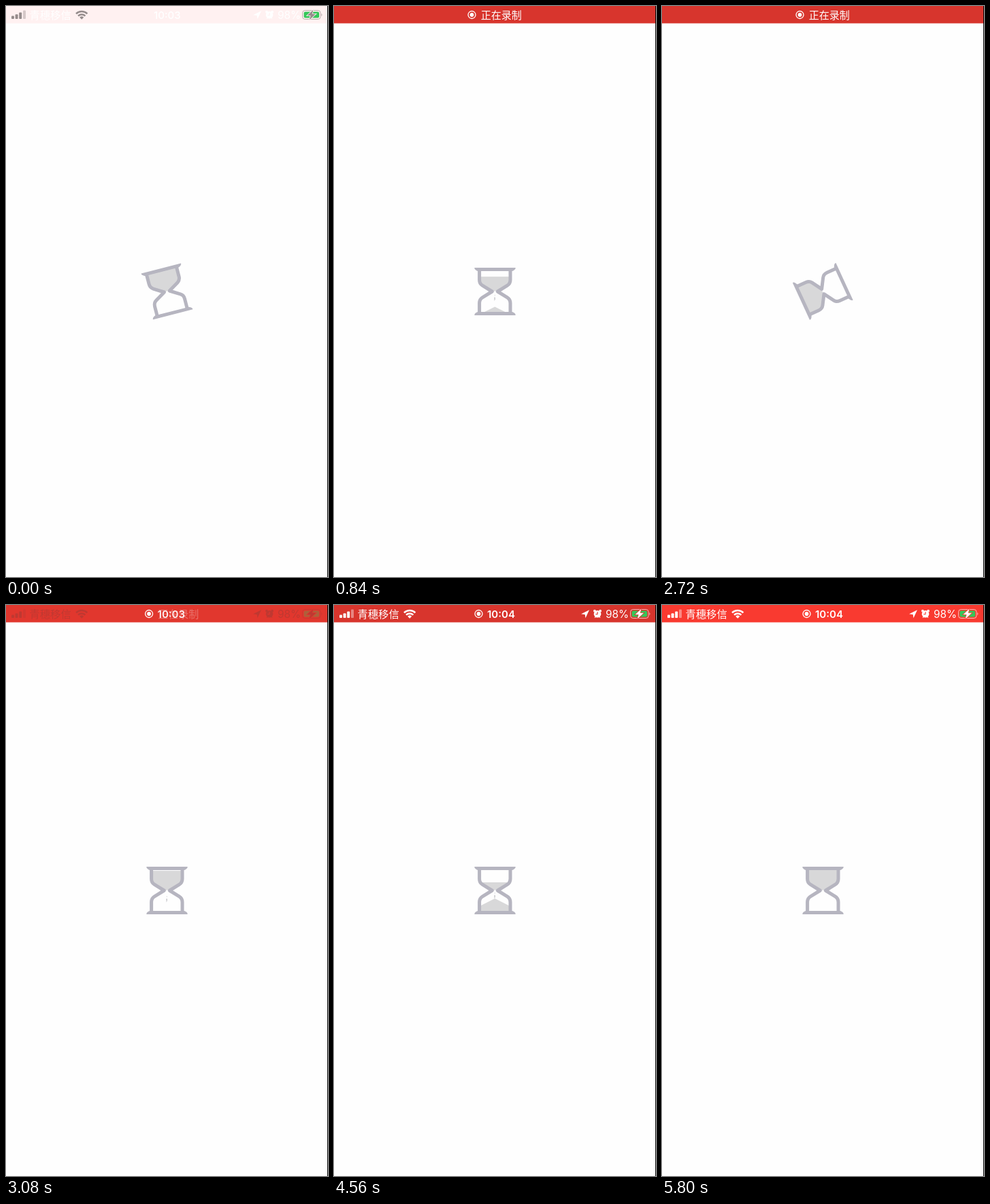
An HTML page that plays this animation: 473x840 px, repeating every 5.84 s.

```html
<!DOCTYPE html>
<html lang="zh">
<head>
<meta charset="utf-8">
<title>Hourglass loader</title>
<style>
  html, body { margin: 0; width: 100%; height: 100%; overflow: hidden; background: #fefefe; }
  svg { display: block; width: 100%; height: 100%; }
  .zh { font: 400 15px "Noto Sans CJK SC", "Noto Sans CJK", sans-serif; fill: #fff; }
  .num { font-family: Inter, "Liberation Sans", sans-serif; fill: #fff; }
  .line { fill: none; stroke: currentColor; }
  .ink { fill: currentColor; }
</style>
</head>
<body>
<svg viewBox="0 0 473 840">
  <defs>
    <clipPath id="upper"><path d="M215 389H258V406L253 411L237 419.5H235L220 411L215 406Z"/></clipPath>
    <clipPath id="lower"><path d="M215 451.5H258V434L253 429L237 420.5H235L220 429L215 434Z"/></clipPath>
    <path id="wall" d="M213.6 389V403Q213.6 408.500 218 411.200L232.300 420L218 428.800Q213.600 431.500 213.600 437V452"/>
    <path id="cap" d="M206.500 385H266.500Q267.500 387.500 262 390H211Q205.500 387.500 206.500 385Z"/>
  </defs>

  <rect width="473" height="840" fill="#fefefe"/>
  <rect id="bar" width="473" height="25.500"/>

  <g id="icons">
    <g class="ink">
      <rect x="8" y="14.500" width="4" height="4.500" rx="1"/>
      <rect x="13.600" y="12.300" width="4" height="6.700" rx="1"/>
      <rect x="19.200" y="9.600" width="4" height="9.400" rx="1"/>
      <rect x="25" y="6.500" width="4" height="12.500" rx="1" opacity=".4"/>
      <path d="M111.200 19.800L108.200 16.700A4.300 4.300 0 0 1 114.200 16.700Z"/>
    </g>
    <g class="line" stroke-width="2.500">
      <path d="M103 11.400A11.600 11.600 0 0 1 119.400 11.400"/>
      <path d="M106 14.700A7.400 7.400 0 0 1 116.400 14.700"/>
    </g>
    <g id="labels">
      <text class="zh" x="34.500" y="18.500" style="font-size:15.300px">青穗移信</text>
      <text class="num" x="399" y="18.500" font-size="15.300">98%</text>
      <path d="M363 13.200L375 7.200L369.400 19.300L368.700 13.900Z" fill="currentColor"/>
      <g fill="currentColor">
        <circle cx="387" cy="13.200" r="5.300"/>
        <circle cx="382.900" cy="8.700" r="1.900"/>
        <circle cx="391.100" cy="8.700" r="1.900"/>
        <path d="M382.500 19L384 16H390L391.500 19L389 18H385Z"/>
      </g>
      <path id="hands" d="M387 10V13.500H384.300" fill="none" stroke-width="1.100"/>
    </g>
    <rect class="line" x="435.500" y="6.500" width="26.500" height="13" rx="3.800" opacity=".65"/>
    <path class="ink" d="M463.300 11Q465.600 13 463.300 15Z" opacity=".65"/>
    <rect x="437.500" y="8.500" width="22.500" height="9" rx="2" fill="#34c759"/>
    <path id="bolt" d="M451.500 5.500L442.500 14H447.500L445.500 20.500L455 11.700H449.700Z"
          fill="currentColor" stroke-width="1.600" paint-order="stroke"/>
  </g>

  <text id="label" class="zh" x="215.800" y="18.500">正在录制</text>
  <g id="record">
    <circle cx="202.500" cy="13" r="5.500" fill="none" stroke="#fff" stroke-width="1.300"/>
    <circle cx="202.500" cy="13" r="2.900" fill="#fff"/>
  </g>
  <text id="clock" class="num" x="225" y="18.500" font-size="15" font-weight="600"></text>

  <g id="glass">
    <g fill="#d8d8d9">
      <rect id="top" x="210" width="53" clip-path="url(#upper)"/>
      <path id="pile" clip-path="url(#lower)"/>
      <path id="drop" d="M235.200 -2H237V1L235.500 3.500Z" fill="#cfcfd2"/>
      <rect id="trail" x="235.800" width="1" height="2" fill="#dfdfe2"/>
    </g>
    <g fill="none" stroke="#b6b5c0" stroke-width="5" stroke-linejoin="round">
      <use href="#wall"/>
      <use href="#wall" transform="matrix(-1 0 0 1 472.600 0)"/>
    </g>
    <g fill="#b6b5c0">
      <use href="#cap"/>
      <use href="#cap" transform="matrix(1 0 0 -1 0 840)"/>
    </g>
  </g>
  <rect x="472" width="1" height="840" fill="#080808"/>
</svg>

<script>
const LOOP = 5840, CYCLE = 2862, FIRST = 65;
const POUR_END = 2473, TURN = 2512;
const RED = [255, 59, 49], DIM = [215, 53, 45], PINK = [255, 241, 241];
const GREY = [149, 140, 140], DARK = [80, 25, 20], WHITE = [255, 255, 255];

const el = {};
document.querySelectorAll('[id]').forEach(n => el[n.id] = n);

const ramp = (t, a, b) => Math.min(1, Math.max(0, (t - a) / (b - a)));
const ease = x => (1 - Math.cos(Math.PI * x)) / 2;
const mix = (a, b, k) => a.map((v, i) => v + (b[i] - v) * k);
const rgb = c => `rgb(${c.map(Math.round)})`;
const set = (node, attrs) => {
  for (const k in attrs) node.setAttribute(k, attrs[k]);
};

function drawGlass(t) {
  const p = (t - FIRST + CYCLE) % CYCLE;
  const turning = p >= TURN;
  const angle = turning ? -180 + 180 * ease(ramp(p, TURN, CYCLE)) : 0;
  set(el.glass, { transform: `rotate(${angle} 236.3 420)` });

  // The funnel drains a little faster than the straight part.
  const level = turning ? 389 : 390 + 21 * ramp(p, 60, 1900) + 9 * ramp(p, 1900, POUR_END);
  set(el.top, { y: level, height: Math.max(0, 420 - level) });

  const apex = turning ? 452 : 452 - 30.5 * ramp(p, 0, POUR_END);
  set(el.pile, { d: `M236.3 ${apex}l24 12V470H212.300V${apex + 12}Z` });

  const y = 422 + ((p - 33 + 219) % 219) * 0.1;
  const falling = p > 33 && p < POUR_END && y < apex - 3;
  set(el.drop, { transform: `translate(0 ${y})`, opacity: falling ? 1 : 0 });
  set(el.trail, { y: y - 6, opacity: falling && y > 428 ? 1 : 0 });
}

function drawStatus(t) {
  const pulse = (1 + Math.cos(2 * Math.PI * (t - 910) / 1860)) / 2;
  const bar = rgb(mix(PINK, mix(RED, DIM, pulse), ease(ramp(t, 0, 320))));
  set(el.bar, { fill: bar });
  set(el.hands, { stroke: bar });
  set(el.bolt, { stroke: bar });

  const early = t < 1500;
  const shown = ramp(t, 3040, 3300);
  const ink = early ? GREY : mix(DARK, WHITE, shown);
  el.icons.style.color = rgb(ink);
  el.labels.style.color = rgb(early ? WHITE : ink);
  el.labels.querySelectorAll('text').forEach(n => n.style.fill = rgb(early ? WHITE : ink));
  set(el.icons, { opacity: early ? 1 - ramp(t, 40, 300) : 0.15 * ramp(t, 3040, 3060) + 0.85 * shown });

  const slide = 10 * ease(ramp(t, 2920, 3160));
  const recording = ramp(t, 100, 350);
  set(el.record, { transform: `translate(${slide} 0)`, opacity: recording });
  set(el.label, {
    transform: `translate(${slide} 0)`,
    opacity: recording * (1 - ramp(t, 2940, 3140))
  });

  el.clock.textContent = early || t < 3500 ? '10:03' : '10:04';
  set(el.clock, {
    x: early ? 217 : 215 + slide,
    'font-weight': early ? 500 : 600,
    opacity: early ? 1 - ramp(t, 40, 300) : ramp(t, 2960, 3090)
  });
}

function frame() {
  const t = performance.now() % LOOP;
  drawGlass(t);
  drawStatus(t);
  requestAnimationFrame(frame);
}
frame();
</script>
</body>
</html>
```
